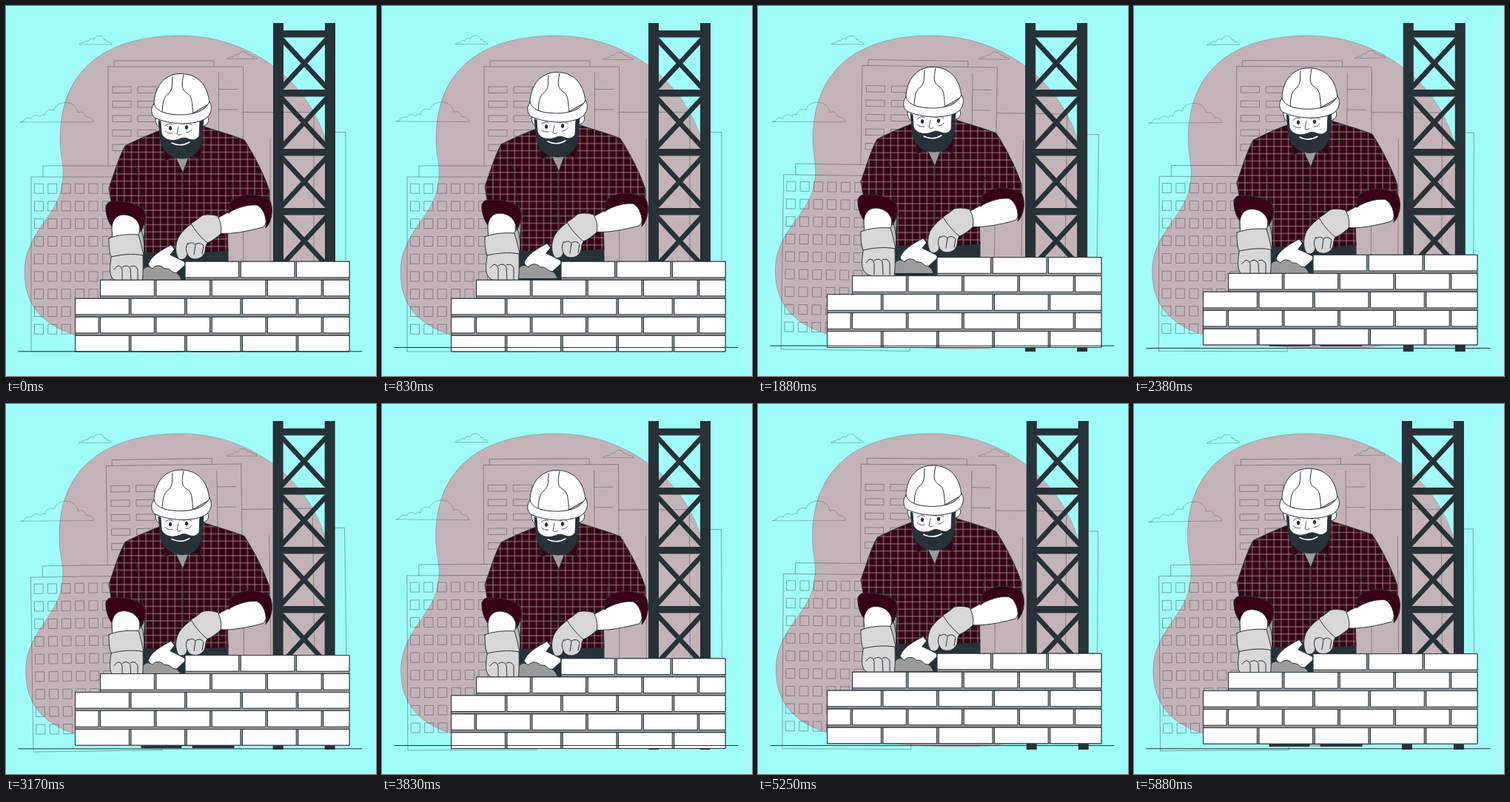
Recreate the animation shown at these times as an HTML page. Size 500 px wide and 500 px high, loop 5.93 s.

```html
<!DOCTYPE html>
<html lang="en">
<head>
<meta charset="utf-8">
<title>Bricklayer</title>
<style>
  html, body { margin: 0; width: 100%; height: 100%; overflow: hidden; background: #a0fcf8; }
  svg { display: block; width: 100%; height: 100%; }
  .thin { fill: none; stroke: #263238; stroke-width: .8; stroke-opacity: .5; }
  .ink { stroke: #263238; stroke-width: 1; stroke-linejoin: round; stroke-linecap: round; }
  .line { fill: none; }
  .dark { fill: #263238; }
  .white { fill: #fff; }
  .glove { fill: #d7d7d7; }
  .grey { fill: #9b9b9b; }
  .cloth { fill: #380014; }
  #blob { fill: #c3b3b9; stroke: #263238; stroke-width: .6; stroke-opacity: .4; }
  #clouds { stroke-opacity: .38; }
</style>
</head>
<body>
<svg viewBox="0 0 500 500">
  <defs>
    <pattern id="plaid" x="145" y="173" width="9.8" height="9.8" patternUnits="userSpaceOnUse">
      <rect width="9.8" height="9.8" fill="#350413"/>
      <path d="M4.9 0V9.8M0 4.9H9.8" stroke="#b8a0a8" stroke-width=".75"/>
    </pattern>
  </defs>

  <path id="blob" d="M235 40C145 40 73 78 73 180C73 205 80 218 76 240C71 285 25 305 25 360C25 420 70 440 110 449C170 461 240 464 300 462C400 460 438 400 439 300C440 260 441 235 437 205C425 120 345 40 235 40Z"/>

  <g id="city" class="thin">
    <path d="M138 216V82H320.500V440M146 82V74H281V82M287.500 90V178M287.500 112.500H313M287.500 140H313"/>
    <path d="M320.500 143.500H416V345M357 345V179M432 170.500H459V440"/>
    <path d="M34 231H208V467H34ZM50 231V216H192V231"/>
  </g>

  <g id="clouds" class="thin">
    <path d="M19 157H118C117 152 114 150 108 150C106 144 102 142 97 144C96 134 86 129 77 131C70 132 66 136 65 141C58 138 53 142 52 148C49 146 47 147 46 150C43 146 35 147 34 152C28 150 24 153 24 156Z"/>
    <path d="M99 52H143C142 49 140 48 137 49C137 46 135 45 133 46C132 38 120 39 119 45C115 43 112 45 111 48C108 46 106 48 105 50C102 49 101 50 99 52Z"/>
    <path d="M298 71.500H340C339 69 336 68 333 69C332 66 330 65 327 66C325 60 315 60 314 66C310 65 308 66 307 69C303 68 300 70 298 71.500Z"/>
  </g>

  <g id="tower" class="dark"></g>

  <g id="worker" class="ink">
    <!-- legs and shoes -->
    <path class="dark" d="M186 328H300V464H308V467H252V464H237V467H183V464H186Z"/>

    <!-- shirt -->
    <path fill="url(#plaid)" d="M211 167C195 173 172 183 161 189C152 205 146 227 139 246L143 270L188 282L186 333C220 335 265 334 300 331L299 290L305 268L356 264V250C349 228 336 203 322 181C305 174 282 168 265 162Z"/>
    <path class="line" d="M239 224V332M173 212Q181 222 181 250L187 282M311 230Q303 245 304 266"/>
    <path class="grey" d="M228 201H248L239 225Z"/>
    <path class="cloth" d="M211 177L215 209L229 203Q217 195 211 177ZM265 174L263 208L247 202Q259 192 265 174Z"/>

    <!-- arms -->
    <path class="white" d="M143 296C146 276 176 276 181 294L180 316H144Z"/>
    <path class="cloth" d="M139 265C150 262 180 265 187 277C191 287 187 296 182 305C181 290 172 283 160 282C149 282 145 288 143 298C138 292 134 280 135 270Z"/>
    <path class="white" d="M281 290C300 277 325 267 341 268C353 274 355 294 347 299C328 304 305 309 287 307Z"/>
    <path class="cloth" d="M303 266C314 251 342 253 356 262C362 272 360 291 351 300C353 287 348 273 339 269C324 268 309 273 301 280Z"/>

    <!-- mortar and trowel -->
    <path class="white" d="M223 323C209 330 196 338 192 349C199 362 216 364 230 361L243 349Z"/>
    <path class="dark" d="M222 336L229 327L236 338L242 346L232 341Z"/>
    <path class="grey" d="M184 370V358C188 351 194 351 198 355C201 349 211 350 214 355C221 354 223 358 226 360C232 360 235 364 237 370Z"/>

    <!-- left glove -->
    <path fill="#bdbdbd" d="M179 308L183 303C187 315 187 325 186 338L182 336Z"/>
    <path class="glove" d="M143 335C141 345 140 355 141 362C143 370 150 374 158 374H184C186 360 185 345 185 334Z"/>
    <path class="glove" d="M139 314C150 309 167 308 179 309C182 318 184 328 186 337C170 334 155 336 142 339C139 331 139 322 139 314Z"/>
    <path class="line" d="M146 356Q153 346 157 356V372M157 353Q164 348 168 355L169 372M168 352Q175 349 178 356V372"/>

    <!-- right glove -->
    <path class="glove" d="M251 294C240 302 233 310 231 318C228 328 230 338 234 342C240 344 244 340 245 335C248 344 262 344 267 336C271 331 268 324 273 319Z"/>
    <path class="glove" d="M265 283C272 281 280 282 286 284C290 291 292 300 290 308C284 313 278 318 272 320C265 314 256 305 250 294Q257 290 265 283Z"/>
    <path class="line" d="M245 335Q241 327 246 320M246 322Q252 317 256 323L254 336M256 322Q263 318 267 324L265 335"/>

    <!-- head -->
    <path class="white" d="M206 150C200 146 201 162 208 164L211 188H262L266 162C274 162 277 150 269 147Z"/>
    <path class="dark" d="M206 155L209 182C211 197 224 206 238 206C252 206 262 198 264 182L267 153L262 156L261 176C256 183 250 181 245 179C240 177 236 179 234 180C222 184 213 180 210 172L209 156Z"/>
    <path fill="none" stroke="#fff" stroke-width="1.6" d="M224 185Q236 191 248 184"/>
    <path class="line" d="M215 162Q219 157 225 160M240 160Q246 156 251 161M233 163L231 173Q234 176 237 173M215 169Q219 173 225 172M243 171Q248 171 251 167" stroke-width=".8"/>
    <ellipse class="dark" cx="222" cy="165" rx="1.700" ry="2.500"/>
    <ellipse class="dark" cx="244" cy="164" rx="1.700" ry="2.500"/>

    <!-- helmet -->
    <path class="white" d="M200 140C198 111 213 91.500 236 91.500C260 91.500 273 108 275 132L240 152Z"/>
    <path class="line" d="M225 96C224 108 226 112 219 119C212 124 212 132 211 144M240 93C237 108 237 113 245 118C252 122 251 130 253 147"/>
    <path class="white" d="M200 132C195 138 196 147 201 151C212 156 222 158 237 159C252 159 264 156 270 152C277 147 280 137 275 129C271 138 262 146 238 147C220 147 203 144 200 132Z"/>
  </g>

  <g id="wall" class="ink"></g>
  <path id="ground" class="ink line" d="M17 466.800H481"/>
</svg>

<script>
const $ = id => document.getElementById(id);

function add(parent, tag, attrs) {
  const el = document.createElementNS('http://www.w3.org/2000/svg', tag);
  for (const key in attrs) el.setAttribute(key, attrs[key]);
  $(parent).append(el);
}
const box = (parent, x, y, width, height, cls) =>
  add(parent, 'rect', { x, y, width, height, ...(cls && { class: cls }) });

function drawWindows() {
  for (let row = 0; row < 9; row++)
    for (let col = 0; col < 9; col++)
      box('city', 38.4 + col * 18.4, 240.2 + row * 23.75, 12, 13);
  for (let row = 0; row < 5; row++)
    for (const x of [144, 178]) box('city', x, 109 + row * 19.5, 25, 8.5);
}

function drawTower() {
  box('tower', 361, 23, 14, 444);
  box('tower', 431, 23, 14, 444);
  for (let y = 33; y < 300; y += 80) {
    box('tower', 374, y, 58, 9.5);
    add('tower', 'path', {
      d: `M373 ${y + 12}L433 ${y + 77}M433 ${y + 12}L373 ${y + 77}`,
      stroke: '#263238', 'stroke-width': 6.5
    });
  }
}

// Each row: left end of the course, x of the first full-pitch joint
function drawWall() {
  const right = 464, pitch = 75.3, gap = 3, height = 21.6;
  const rows = [[242.3, 242.3], [128, 128], [94, 94], [94, 52.7], [94, 94]];
  rows.forEach(([left, first], i) => {
    const y = 345.3 + i * 25;
    box('wall', left, y, right - left, i < 4 ? 25 : height, 'grey');
    for (let x = first; x < right; x += pitch) {
      const start = Math.max(x, left);
      box('wall', start, y, Math.min(x + pitch - gap, right) - start, height, 'white');
    }
  });
}

const LOOP = 5930, CYCLE = 3000, LAG = 35;
const FLOAT = [[0, 0], [.5, -10], [1, 0]];
const WIND = [[0, 0], [.25, 1], [.75, -1], [1, 0]];
const SHAKE = [[0, 0], [.1, -1], [.2, 2], [.3, -4], [.4, 4], [.5, -4],
               [.6, 4], [.7, -4], [.8, 2], [.9, -1], [1, 0]];

// Linear keyframes; each part rests until its delay has passed
function pose(keys, t, delay) {
  const age = t - delay - LAG;
  if (age <= 0) return 0;
  const p = age % CYCLE / CYCLE;
  const i = keys.findIndex(k => k[0] > p);
  const [p0, v0] = keys[i - 1], [p1, v1] = keys[i];
  return v0 + (v1 - v0) * (p - p0) / (p1 - p0);
}

const move = (id, x, y) => $(id).setAttribute('transform', `translate(${x} ${y})`);
const turn = (id, angle, x, y) => $(id).setAttribute('transform', `rotate(${angle} ${x} ${y})`);

function render(t) {
  const sway = pose(WIND, t, 1000);
  turn('blob', sway, 232, 251);
  turn('city', sway, 246.5, 270.5);
  turn('clouds', pose(WIND, t, 500), 179.5, 98.5);
  move('tower', pose(SHAKE, t, 500), 0);
  move('worker', 0, pose(FLOAT, t, 500));
  move('wall', 0, pose(FLOAT, t, 1000));
  move('ground', 0, pose(FLOAT, t, 0));
}

drawWindows();
drawTower();
drawWall();

const begin = performance.now();
function tick() {
  render((performance.now() - begin) % LOOP);
  requestAnimationFrame(tick);
}
tick();
</script>
</body>
</html>
```
